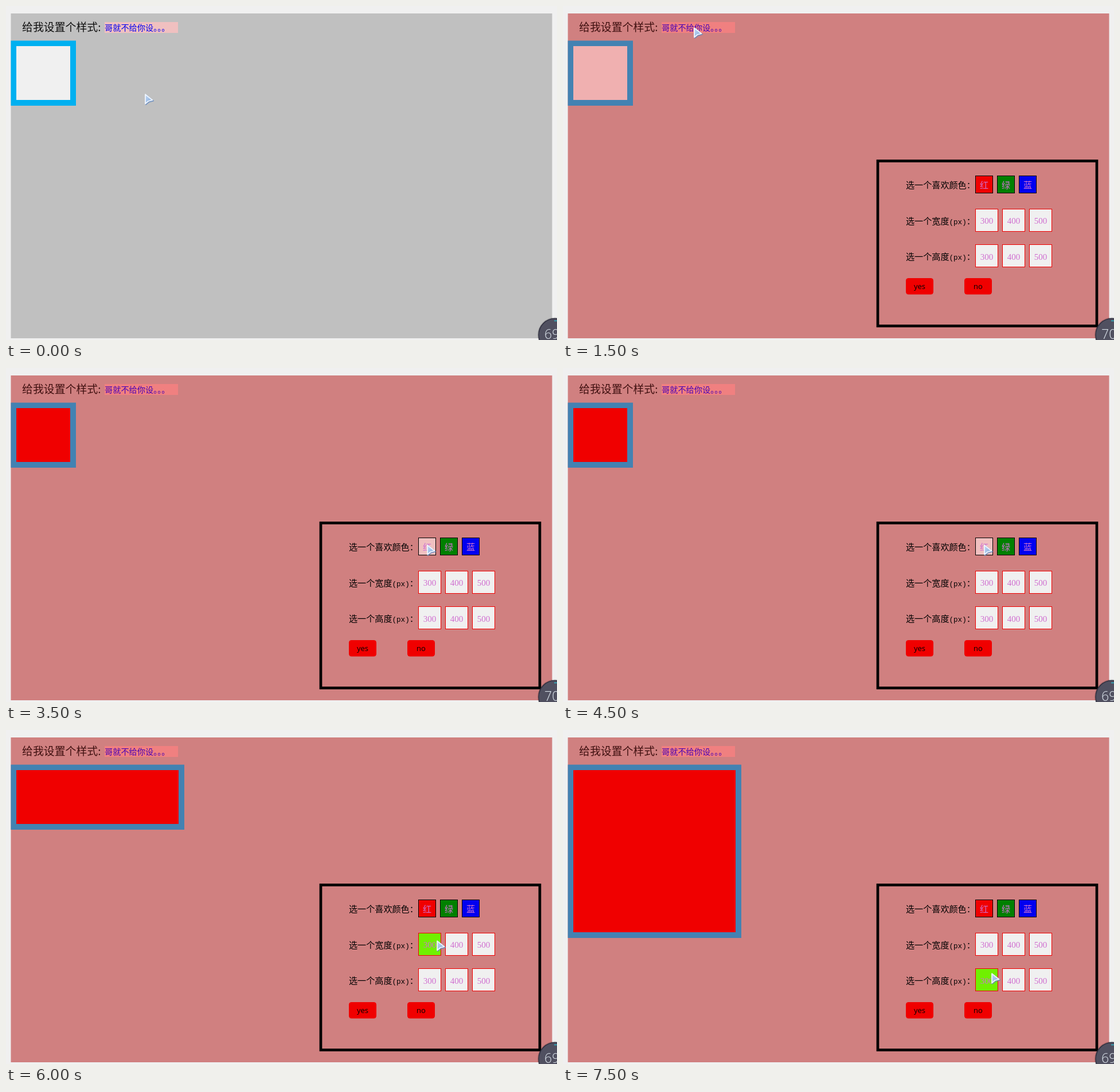
An HTML page for the animation above (8 s loop, 961 by 583 pixels).

```html
<!DOCTYPE html>
<html lang="zh">
<head>
<meta charset="utf-8">
<style>
  html, body { margin: 0; width: 100%; height: 100%; overflow: hidden; background: #f0f0f0; }
  svg { display: block; width: 961px; height: 583px; font-family: "Noto Sans CJK SC", sans-serif;
        --page: #c0c0c0; --frame: #00b0f0; --linkBg: #f0c0c0; --link: #0000f0; --ink: #101010; }
  svg.open { --page: #d08080; --frame: #4382b2; --linkBg: #f08080; --link: #4800b4; --ink: #401010; }
  #panel { visibility: hidden; font-size: 15.1px; }
  .open #panel { visibility: visible; }
  .mono { font: 12.6px "Liberation Mono", monospace; }
  .pick { text-anchor: middle; fill: #d070d0; }
  .num { font-family: "Liberation Serif", serif; }
  .btn { font: 13px "Open Sans", sans-serif; text-anchor: middle; }
</style>
</head>
<body>
<svg id="stage" viewBox="0 0 961 583">
  <defs>
    <linearGradient id="glass" x2="1" y2="1">
      <stop offset="0" stop-color="#c4daf4"/><stop offset="1" stop-color="#7fa6dc"/>
    </linearGradient>
  </defs>
  <rect x="8.5" y="13" width="944" height="567" fill="var(--page)"/>
  <text x="28" y="44" font-size="18.9" font-weight="300" fill="var(--ink)">给我设置个样式:</text>
  <rect x="172" y="28" width="128" height="19" fill="var(--linkBg)"/>
  <text x="172" y="43" font-size="14.2" fill="var(--link)">哥就不给你设。。。</text>
  <rect id="outer" x="8.5" y="60.5" fill="var(--frame)"/>
  <rect id="inner" x="18" y="70"/>

  <g id="panel">
    <rect x="549" y="270.5" width="382" height="288" fill="none" stroke="#000" stroke-width="4.7"/>
    <text x="598" y="318">选一个喜欢颜色：</text>
    <text x="598" y="380.5">选一个宽度<tspan class="mono">(px)</tspan>：</text>
    <text x="598" y="442.5">选一个高度<tspan class="mono">(px)</tspan>：</text>
    <g id="picks"></g>
    <rect x="598" y="475" width="48" height="28.5" rx="4.5" fill="#f00000"/>
    <rect x="700" y="475" width="48" height="28.5" rx="4.5" fill="#f00000"/>
    <text class="btn" x="622" y="494">yes</text>
    <text class="btn" x="724" y="494">no</text>
  </g>

  <g id="gauge">
    <circle cx="957.5" cy="574" r="30.5" fill="#000" opacity=".16"/>
    <circle cx="957.5" cy="574" r="28.5" fill="#505060" stroke="#303040" stroke-width="1.5"/>
    <path d="M956 549.5h5" stroke="#30b0c0" stroke-width="1.6"/>
    <text id="count" x="939" y="580.5" fill="#d8e0e8" font-size="23" font-weight="300"
          style="font-family:'Open Sans',sans-serif"></text>
  </g>

  <g id="cursor" stroke-linejoin="round">
    <path d="M2 2V19L7.5 14.5L15 12.5Z" fill="#6088c0" stroke="#6088c0" stroke-width="2" opacity=".75"/>
    <path d="M1 1.2V17.5L6.5 13L13.5 11.2Z" fill="url(#glass)" stroke="#f0f6ff" stroke-width="1.8"/>
  </g>
</svg>
<script>
const $ = id => document.getElementById(id);
const STEP = 500, LOOP = 8000;

// Cursor tip from the given step onward.
const moves = [
  [0, 242, 153], [1, 157, 58], [2, 228, 37], [4, 666, 229], [5, 732, 307], [6, 734, 308],
  [10, 773, 334], [11, 751, 367], [13, 782, 401], [14, 747, 424]
];

const picks = [];
function addPick(x, y, w, h, label, fill, hover, stroke, kind, baseline) {
  $('picks').insertAdjacentHTML('beforeend',
    `<rect x="${x + .5}" y="${y + .5}" width="${w - 1}" height="${h - 1}" stroke="${stroke}"/>` +
    `<text class="pick ${kind}" x="${x + w / 2}" y="${baseline}">${label}</text>`);
  const rect = $('picks').lastElementChild.previousElementSibling;
  picks.push({ rect, x, y, w, h, fill, hover });
}
[['红', '#f00000'], ['绿', '#008000'], ['蓝', '#0000f0']].forEach(([label, fill], i) =>
  addPick(719 + 38 * i, 296, 31, 31, label, fill, '#f0c0c0', '#000', '', 317.5));
for (const y of [354, 416.5])
  [300, 400, 500].forEach((size, i) =>
    addPick(Math.round(719 + 47.2 * i), Math.floor(y), 40, 40, size, '#f0f0f0', '#70f000', '#f00000', 'num', y + 26));

function setSize(rect, w, h) {
  rect.setAttribute('width', w);
  rect.setAttribute('height', h);
}

function render(time) {
  const step = Math.floor(time % LOOP / STEP);
  const [, x, y] = moves.filter(m => m[0] <= step).pop();
  const w = step >= 12 ? 283 : 94, h = step >= 15 ? 283 : 94;
  const open = step >= 3;

  $('stage').classList.toggle('open', open);
  $('cursor').setAttribute('transform', `translate(${x} ${y})`);
  setSize($('outer'), w + 19.5, h + 19.5);
  setSize($('inner'), w, h);
  $('inner').setAttribute('fill', step >= 7 ? '#f00000' : open ? '#f0b0b0' : '#f0f0f0');
  $('count').textContent = step >= 2 && step < 9 ? '70' : '69';
  for (const p of picks) {
    const over = x >= p.x && x < p.x + p.w && y >= p.y && y < p.y + p.h;
    p.rect.setAttribute('fill', over ? p.hover : p.fill);
  }
}

const start = performance.now();
(function tick() {
  render(performance.now() - start);
  requestAnimationFrame(tick);
})();
</script>
</body>
</html>
```
